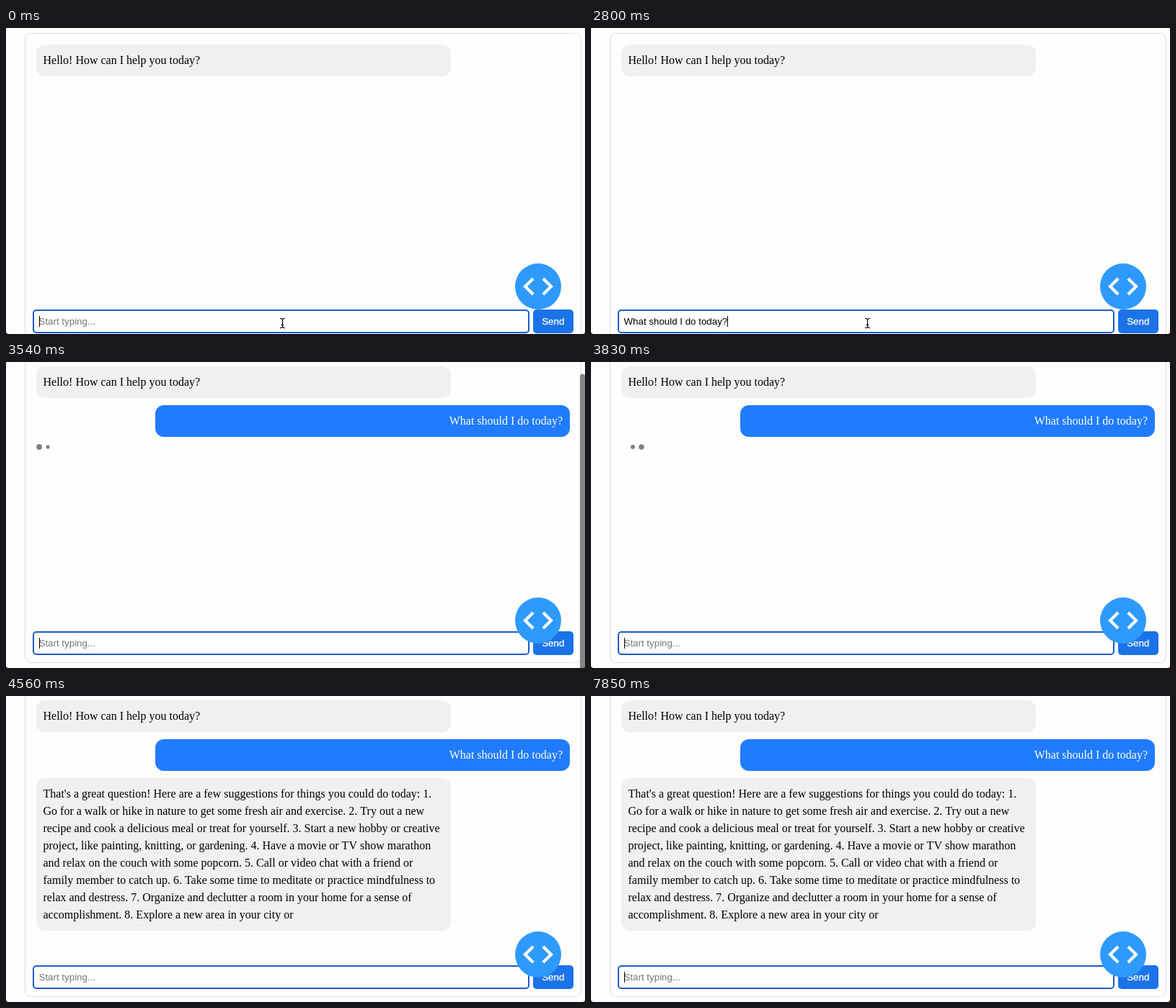
Write an HTML page with a canvas that moves like this. It is 803x425 px and loops after 8000 ms.

```html
<!DOCTYPE html>
<html lang="en">
<head>
<meta charset="utf-8">
<title>Chat</title>
<style>
  html, body { margin: 0; width: 100%; height: 100%; overflow: hidden; background: #fefefe; }
  canvas { display: block; }
</style>
</head>
<body>
<canvas id="stage" width="803" height="425"></canvas>
<script>
const ctx = document.getElementById('stage').getContext('2d');
const W = 803, H = 425, LOOP = 8000;
const STEP = 146.5;
const SENT = 3095, REPLIED = 4405;
const SERIF = '16px "Liberation Serif", "Times New Roman", serif';
const SANS = '13.3333px "Liberation Sans", Arial, sans-serif';

const QUESTION = 'What should I do today?';
const REPLY = [
  "That's a great question! Here are a few suggestions for things you could do today: 1.",
  'Go for a walk or hike in nature to get some fresh air and exercise. 2. Try out a new',
  'recipe and cook a delicious meal or treat for yourself. 3. Start a new hobby or creative',
  'project, like painting, knitting, or gardening. 4. Have a movie or TV show marathon',
  'and relax on the couch with some popcorn. 5. Call or video chat with a friend or',
  'family member to catch up. 6. Take some time to meditate or practice mindfulness to',
  'relax and destress. 7. Organize and declutter a room in your home for a sense of',
  'accomplishment. 8. Explore a new area in your city or'
];
// Caret toggles once the reply is in: off, on, off, on ...
const BLINKS = [4555, 4855, 5305, 5745, 6345, 6795, 7245, 7845];

const clamp = (v, lo, hi) => Math.min(hi, Math.max(lo, v));
const smooth = p => p * p * (3 - 2 * p);

function box(x, y, w, h, r, fill, stroke, lineWidth) {
  ctx.beginPath();
  ctx.roundRect(x, y, w, h, r);
  if (fill) { ctx.fillStyle = fill; ctx.fill(); }
  if (stroke) {
    ctx.strokeStyle = stroke;
    ctx.lineWidth = lineWidth;
    ctx.stroke();
  }
}

function text(str, x, y, font, color, align = 'left') {
  ctx.font = font;
  ctx.fillStyle = color;
  ctx.textAlign = align;
  ctx.fillText(str, x, y);
}

function disc(x, y, r, color) {
  ctx.beginPath();
  ctx.arc(x, y, r, 0, Math.PI * 2);
  ctx.fillStyle = color;
  ctx.fill();
}

function line(points, color, width) {
  ctx.beginPath();
  points.forEach(([x, y]) => ctx.lineTo(x, y));
  ctx.strokeStyle = color;
  ctx.lineWidth = width;
  ctx.stroke();
}

function bubble(x, y, lines, mine) {
  box(x, y, 575, 20 + 24 * lines.length, 12, mine ? '#217bff' : '#f0f0f0');
  lines.forEach((str, i) => {
    const base = y + 27 + 24 * i;
    if (mine) text(str, x + 565, base, SERIF, '#fff', 'right');
    else text(str, x + 9.5, base, SERIF, '#000');
  });
}

function typedLength(t) {
  if (t < 135 || t >= SENT) return 0;
  if (t >= 2065) {
    const k = clamp(Math.floor((t - 2065) / STEP), 0, 5);
    return 14 + Math.round(1.5 * (k + 1));
  }
  if (t >= 1765) return 14;
  const k = clamp(Math.floor((t - 135) / STEP), 0, 7);
  return Math.round(1 + k * 11 / 7);
}

// Each dot rests at full size until its delay has passed.
function dotScale(t) {
  if (t < 0) return 1;
  const phase = (t / 1000) % 1;
  return smooth(clamp(1 - Math.abs(phase - 0.4) / 0.4, 0, 1));
}

function inputRow(t) {
  const typed = QUESTION.slice(0, typedLength(t));
  box(38, 392, 687, 31, 4, '#fff', '#1b5cc8', 2);
  if (typed) text(typed, 45.5, 412, SANS, '#000');
  else text('Start typing...', 45.5, 412, SANS, '#757575');

  if (BLINKS.filter(b => t >= b).length % 2 === 0) {
    ctx.font = SANS;
    ctx.fillStyle = '#000';
    ctx.fillRect(Math.round(45.5 + ctx.measureText(typed).width), 400, 1, 15);
  }

  box(731, 391, 56, 33, 5, '#1a73e8');
  text('Send', 743.2, 412, SANS, '#fff');
  ctx.lineWidth = 0.3;
  ctx.strokeStyle = '#fff';
  ctx.strokeText('Send', 743.2, 412);
}

function page(t) {
  box(26.5, 7.5, 771, 427, 8, null, '#dddddd', 1);
  bubble(42, 23, ['Hello! How can I help you today?']);
  if (t >= SENT) {
    bubble(207, 77, [QUESTION], true);
    if (t >= REPLIED) bubble(42, 131, REPLY);
    else for (let i = 0; i < 3; i++) {
      disc(46 + 12 * i, 135, 4 * dotScale(t - 3100 - 200 * i), '#808080');
    }
  }
  inputRow(t);
}

function codeButton() {
  disc(738, 359, 32, '#2e9afe');
  for (const s of [-1, 1]) {
    line([[738 + 6.9 * s, 347.9], [738 + 18 * s, 359], [738 + 6.9 * s, 370.1]], '#fff', 4.2);
  }
}

function pointer() {
  for (const [color, width] of [['rgba(255,255,255,.8)', 3], ['#000', 1.2]]) {
    line([[383.5, 404.5], [383.5, 415.5]], color, width);
    for (const [y, d] of [[403.5, 1.2], [416.5, -1.2]]) {
      line([[380, y], [382, y], [383.5, y + d], [385, y], [387, y]], color, width);
    }
    line([[381.5, 412.5], [385.5, 412.5]], color, width);
  }
}

function scrollbar(t) {
  ctx.globalAlpha = clamp((3830 - t) / 260, 0, 1);
  box(796, 16.5, 7, 415, 3.5, '#858585');
  ctx.globalAlpha = 1;
}

function corner(x, dir, color) {
  ctx.beginPath();
  ctx.moveTo(x, H);
  ctx.lineTo(x, H - 2.5);
  ctx.lineTo(x + 2.5 * dir, H);
  ctx.fillStyle = color;
  ctx.fill();
}

function draw(t) {
  ctx.fillStyle = '#fefefe';
  ctx.fillRect(0, 0, W, H);
  ctx.save();
  if (t >= SENT) ctx.translate(0, -17);
  page(t);
  ctx.restore();
  if (t >= SENT) scrollbar(t);
  codeButton();
  if (t < 3245) pointer();
  corner(0, 1, '#444');
  corner(W, -1, '#d8402a');
}

const start = performance.now();
function tick() {
  draw((performance.now() - start) % LOOP);
  requestAnimationFrame(tick);
}
tick();
</script>
</body>
</html>
```
